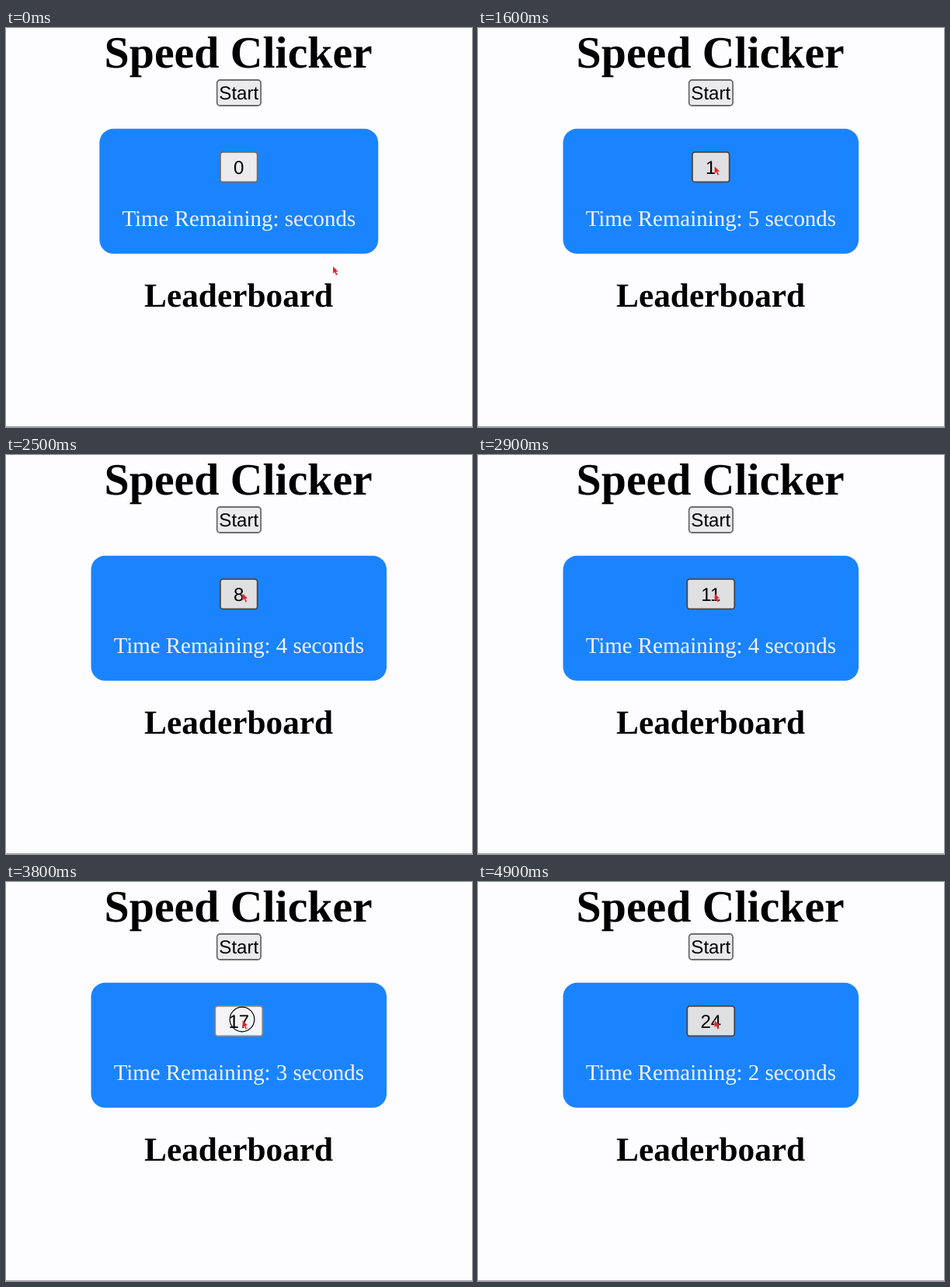
Write an HTML page that moves like this. It is 600 by 514 pixels and loops after 5000 ms.

```html
<!DOCTYPE html>
<html lang="en">
<head>
<meta charset="utf-8">
<title>Speed Clicker</title>
<style>
  html, body { margin: 0; height: 100%; overflow: hidden; background: #fdfcff; }
  svg { display: block; }
  text { text-anchor: middle; font-family: "Liberation Serif", Times, serif; text-rendering: geometricPrecision; }
  .heading { font-weight: bold; }
  .button text { font: 24.1px "Liberation Sans", Arial, sans-serif; }
  .button rect { fill: #ebeaed; stroke: #6c6b6e; stroke-width: 1.8; }
  .button.hover rect { fill: #e0dfe2; stroke: #454447; }
  .button.active rect { fill: #f4f3f6; stroke: #88878a; }
</style>
</head>
<body>
<svg width="600" height="514" viewBox="0 0 600 514">
  <text class="heading" x="299.2" y="51.2" font-size="57.8">Speed Clicker</text>
  <g class="button" id="start">
    <rect x="271.7" y="67" width="56.4" height="33" rx="4"/>
    <text x="299.8" y="92">Start</text>
  </g>
  <rect id="panel" y="129.8" height="161" rx="18" fill="#1a84ff"/>
  <g class="button" id="counter">
    <rect y="159.8" height="38.6" rx="3.5"/>
    <text x="299.8" y="187.8"></text>
  </g>
  <text id="timer" x="299.8" y="254.8" font-size="28.9" fill="#f3f3fb"></text>
  <text class="heading" x="299.6" y="359.2" font-size="43.35">Leaderboard</text>
  <path d="M0 513.5H600" stroke="#a3a2a5"/>
  <g id="pointer">
    <circle id="ring" cx="-.5" cy="-1" r="15.8" fill="none" stroke="#000" stroke-width="1.2"/>
    <path d="M0 0V9.5L2.2 7.5L4 11.8L5.8 11L4 6.9H6.8Z" fill="#ee1c22" stroke="#fff" stroke-opacity=".5" stroke-width=".5"/>
  </g>
</svg>
<script>
const LOOP = 5000, STEP = 100;
const $ = id => document.getElementById(id);

// Pointer stops: time, x, y
const path = [
  [0, 421, 307], [100, 372, 205], [200, 319, 105], [400, 311, 97],
  [500, 306, 92], [600, 304.5, 90], [1100, 304.5, 96], [1200, 304.5, 120],
  [1300, 304.5, 152], [1400, 304.5, 173], [1500, 304.5, 178]
];

function setCentered(rect, width) {
  rect.setAttribute("x", 299.8 - width / 2);
  rect.setAttribute("width", width);
}

// Whole part: completed clicks; fraction: progress through the next click
function clickProgress(t) {
  if (t < 1500) return 0;
  if (t < 4400) return 1.2 + (t - 1600) / 132;
  if (t < 4600) return t < 4500 ? 22 : 22.5;
  return t < 4800 ? 23 : t < 4900 ? 23.5 : 24;
}

function draw(t) {
  const [, x, y] = path.findLast(stop => stop[0] <= t);
  const clicks = clickProgress(t), count = Math.floor(clicks);
  const overStart = y < 101, overCounter = y > 159 && y < 199 && x < 325;
  const down = t === 900 || clicks - count > 0.4;
  const state = over => "button" + (over ? (down ? " active" : " hover") : "");

  $("start").setAttribute("class", state(overStart));
  $("counter").setAttribute("class", state(overCounter));
  $("counter").children[1].textContent = count;
  setCentered($("counter").children[0], count < 10 ? 47.8 : 61);

  const running = t >= 1000;
  const left = running ? 6 - Math.floor(t / 1000) + " " : "";
  $("timer").textContent = `Time Remaining: ${left}seconds`;
  setCentered($("panel"), running ? 380.6 : 358.9);

  $("pointer").setAttribute("transform", `translate(${x} ${y})`);
  $("ring").setAttribute("visibility", down ? "visible" : "hidden");
}

function tick() {
  draw(Math.floor(performance.now() % LOOP / STEP) * STEP);
  requestAnimationFrame(tick);
}
tick();
</script>
</body>
</html>
```
